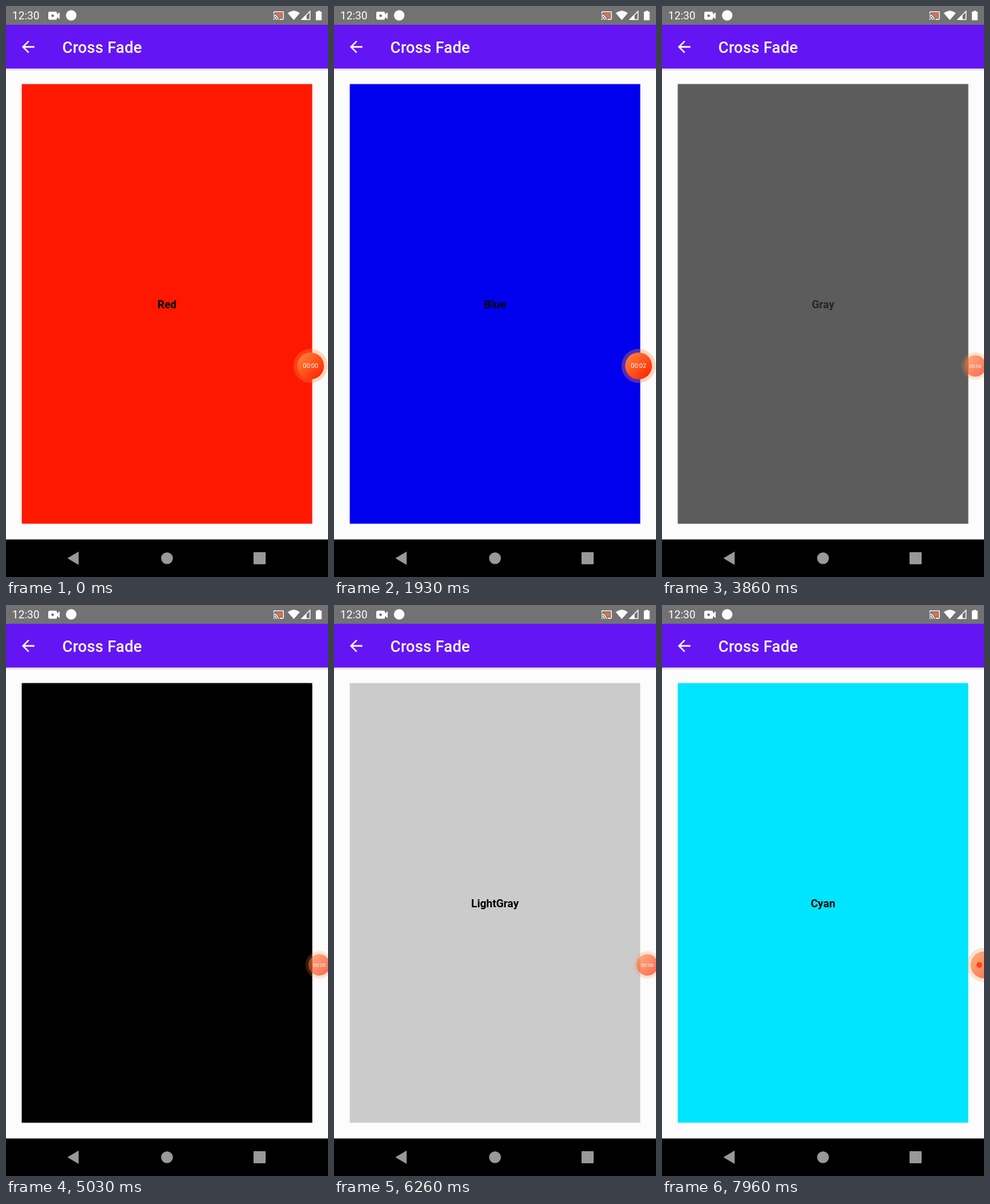
These frames come from a looping animation (480x852 px, 8 s). An HTML page:

```html
<!DOCTYPE html>
<html lang="en">
<head>
<meta charset="utf-8">
<title>Cross Fade</title>
<style>
  html, body { margin: 0; width: 100%; height: 100%; overflow: hidden; background: #fcfcfc; }
  svg { display: block; width: 100%; height: 100%; font-family: Roboto, sans-serif; }
  .label { font-size: 16.33px; font-weight: 700; text-anchor: middle; }
</style>
</head>
<body>
<svg viewBox="0 0 480 852">
  <defs>
    <linearGradient id="shade" x1="0" y1="0" x2="0" y2="1">
      <stop offset="0" stop-opacity=".16"/><stop offset="1" stop-opacity="0"/>
    </linearGradient>
    <linearGradient id="ember" x1=".1" y1=".1" x2=".85" y2=".85">
      <stop offset="0" stop-color="#ff8038"/><stop offset="1" stop-color="#ff2c04"/>
    </linearGradient>
    <clipPath id="panelClip"><rect x="23.5" y="116.5" width="433" height="656"/></clipPath>
  </defs>
  <rect width="480" height="852" fill="#fcfcfc"/>

  <!-- Status bar -->
  <rect width="480" height="28" fill="#727272"/>
  <g fill="#fff">
    <text x="9.3" y="20.3" font-size="16.33">12:30</text>
    <path d="M65 8.5h9q2 0 2 2v2l4-3v10l-4-3v2q0 2-2 2h-9q-2 0-2-2v-8q0-2 2-2z"/>
    <circle cx="69.5" cy="14.5" r="2" fill="#727272"/>
    <circle cx="97.2" cy="14" r="7.8"/>
    <g transform="translate(398 5.8) scale(.7)">
      <path d="M1 18v3h3c0-1.66-1.34-3-3-3zm0-4v2c2.76 0 5 2.24 5 5h2c0-3.87-3.13-7-7-7zm0-4v2c4.97 0 9 4.03 9 9h2c0-6.08-4.93-11-11-11zm20-7H3c-1.1 0-2 .9-2 2v3h2V5h18v14h-7v2h7c1.1 0 2-.9 2-2V5c0-1.1-.9-2-2-2z"/>
      <path d="M19 7H5v1.63c3.96 1.28 7.09 4.41 8.37 8.37H19z" fill="#e8703f"/>
    </g>
    <path d="M420 10.5q9-7 18 0l-9 10.5z"/>
    <path d="M440.8 20.2L453.2 7.8v12.4z" fill="none" stroke="#fff" stroke-width="1.3"/>
    <path d="M440 20.8l8-8v8z"/>
    <path d="M464.3 7.2h4v1.4h2.2v12.6h-8.6V8.6h2.4z"/>
  </g>

  <!-- App bar -->
  <rect y="28" width="480" height="65.3" fill="#6415f4"/>
  <rect y="93.3" width="480" height="4" fill="url(#shade)"/>
  <path fill="#fff" transform="translate(19 47) scale(1.167)"
    d="M20 11H7.83l5.59-5.59L12 4l-8 8 8 8 1.41-1.41L7.83 13H20z"/>
  <text x="84" y="70" font-size="23.33" font-weight="500" letter-spacing=".17" fill="#fff">Cross Fade</text>

  <!-- Fading panel -->
  <g id="outgoing"><rect x="23.5" y="116.5" width="433" height="656"/><text class="label" x="240" y="451.3"></text></g>
  <g id="incoming"><rect x="23.5" y="116.5" width="433" height="656"/><text class="label" x="240" y="451.3"></text></g>
  <g clip-path="url(#panelClip)"><circle id="ripple"/></g>

  <!-- Navigation bar -->
  <rect y="796" width="480" height="56"/>
  <g fill="#999">
    <path d="M91.5 824L108.3 814v20z"/>
    <circle cx="240" cy="824" r="8.8"/>
    <rect x="369" y="815" width="18" height="18" rx="1"/>
  </g>

  <!-- Recorder bubble -->
  <g id="bubble">
    <circle r="25.5" fill="#ff8a40" opacity=".33"/>
    <circle r="20" fill="url(#ember)"/>
    <text id="timer" y="3.4" font-size="9.3" text-anchor="middle" fill="#fff"></text>
  </g>
  <circle id="dot" cx="473" cy="537" r="4.2" fill="#ff4508"/>
</svg>
<script>
const LOOP = 8000, FADE = 300;
const RIPPLE_IN = 75, RIPPLE_GROW = 225, RIPPLE_OUT = 150;
const TOUCH = [240, 560], CENTER = [240, 444.5];

// Each swatch fades in at `start`, shortly after the tap at `press`.
const swatches = [
  { name: 'Red', color: '#ff1800', press: -1e4, start: -1e4 },
  { name: 'Blue', color: '#0000ee', press: 1200, start: 1310 },
  { name: 'Gray', color: '#888888', press: 2430, start: 2535 },
  { name: 'Black', color: '#000000', press: 3680, start: 3782 },
  { name: 'LightGray', color: '#cbcbcb', press: 4940, start: 5040 },
  { name: 'Cyan', color: '#00e5ff', press: 6265, start: 6370 },
];

const $ = id => document.getElementById(id);
const clamp = v => Math.min(1, Math.max(0, v));
const mix = (a, b, k) => a + (b - a) * k;
const setAttrs = (el, attrs) => { for (const k in attrs) el.setAttribute(k, attrs[k]); };

// cubic-bezier(.4, 0, .2, 1)
function fastOutSlowIn(x) {
  if (x <= 0 || x >= 1) return clamp(x);
  let lo = 0, hi = 1;
  for (let i = 0; i < 24; i++) {
    const s = (lo + hi) / 2, r = 1 - s;
    if (1.2 * r * r * s + 0.6 * r * s * s + s ** 3 < x) lo = s; else hi = s;
  }
  return 3 * (1 - lo) * lo * lo + lo ** 3;
}

function showSwatch(layer, swatch, alpha) {
  layer.setAttribute('opacity', alpha);
  layer.children[0].setAttribute('fill', swatch.color);
  layer.children[1].textContent = swatch.name;
}

function drawPanel(t) {
  const index = swatches.findLastIndex(s => t >= s.start);
  const p = fastOutSlowIn((t - swatches[index].start) / FADE);
  showSwatch($('outgoing'), swatches[Math.max(0, index - 1)], 1 - p);
  showSwatch($('incoming'), swatches[index], p);

  const age = t - swatches.findLast(s => t >= s.press).press;
  const grow = 1 - 400 ** (-1.4 * clamp(age / RIPPLE_GROW));
  const alpha = clamp(age / RIPPLE_IN) * (1 - clamp((age - RIPPLE_GROW) / RIPPLE_OUT));
  setAttrs($('ripple'), {
    cx: mix(TOUCH[0], CENTER[0], grow),
    cy: mix(TOUCH[1], CENTER[1], grow),
    r: mix(197, 400, grow),
    opacity: 0.245 * alpha,
  });
}

function drawBubble(t) {
  const dock = fastOutSlowIn((t - 1950) / 250);
  const tuck = fastOutSlowIn((t - 7000) / 200);
  const x = 454 + 13 * dock + 13 * tuck;
  const scale = 1 - 0.2 * dock + 0.2 * tuck;
  setAttrs($('bubble'), { transform: `translate(${x} 537) scale(${scale})`, opacity: 1 - 0.34 * dock });
  $('timer').textContent = tuck > 0 ? '' : '00:0' + Math.floor((t + 300) / 1000);
  $('dot').setAttribute('opacity', tuck);
}

function frame() {
  const t = performance.now() % LOOP;
  drawPanel(t);
  drawBubble(t);
  requestAnimationFrame(frame);
}
frame();
</script>
</body>
</html>
```
